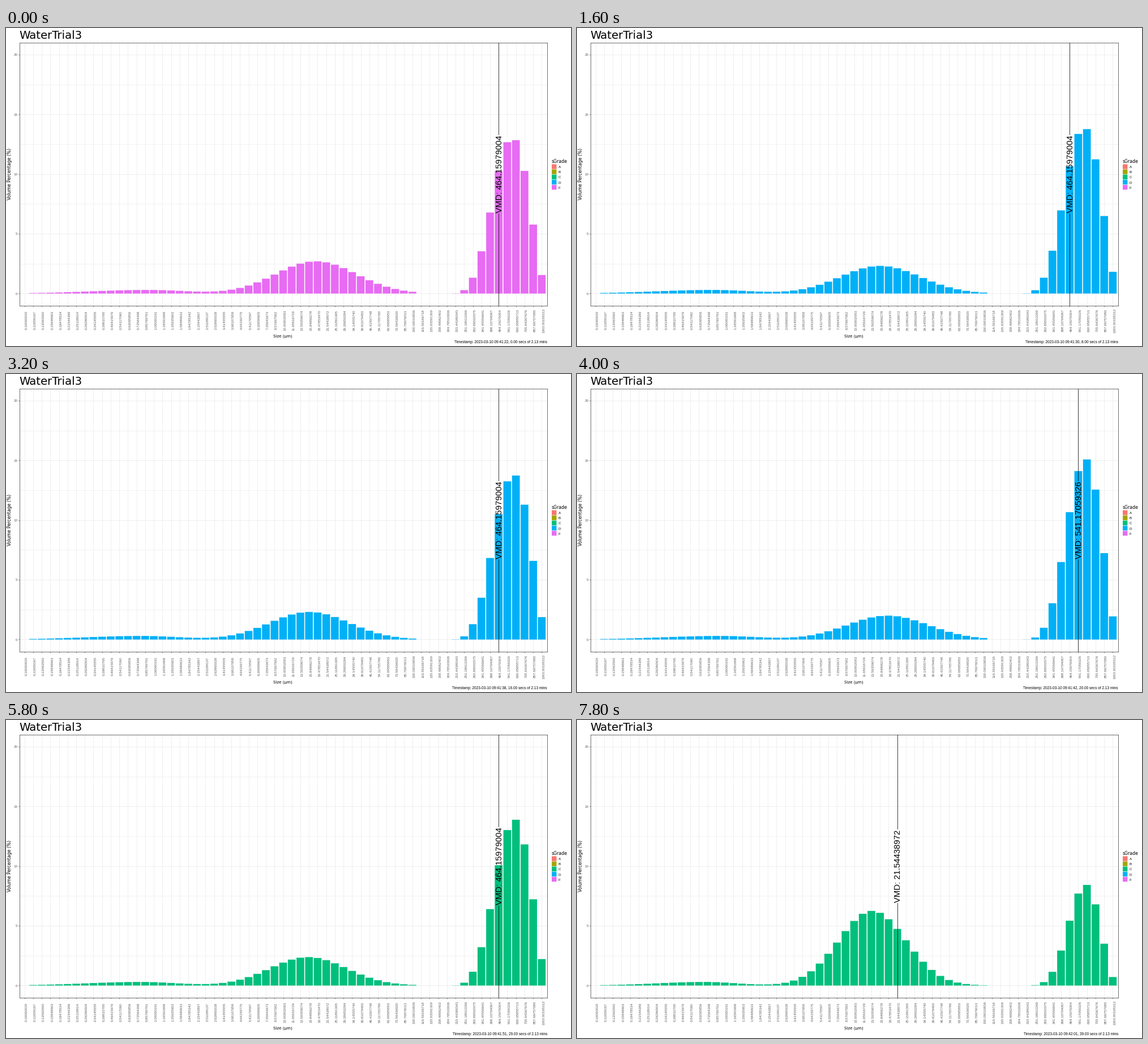
A matplotlib script that plays this animation: 998 by 561 pixels, repeating every 8000 ms.

```python
import numpy as np
import matplotlib.pyplot as plt
from matplotlib.animation import FuncAnimation

W, H, DPI = 998, 561, 64
PX = 72 / DPI                      # points per pixel
FRAMES, INTERVAL = 40, 200

WORDS, DIGITS = "DejaVu Sans", "Liberation Sans"
GREY, DARK, GRID = "#5c5c5c", "#333333", "#ebebeb"
GRADES = {"A": "#f8766d", "B": "#a3a500", "C": "#00bf7d",
          "D": "#00b0f6", "F": "#e76bf3"}

# panel edges in pixels
LEFT, RIGHT, TOP, BOTTOM = 23.5, 955.5, 26, 489.5
BINS = 61
X = np.arange(BINS)
SIZES = np.float32(10 ** (X / 15 - 1) * (1 + 1.96e-6))
STEP = (RIGHT - LEFT) / (BINS + 0.2)
UNIT = (BOTTOM - TOP) / 22

# second, grade, mist (height, bin, width), drops (height, bin, sharpness)
KEYS = [
    (0, "F", 2.70, 33.8, 4.65, 13.10, 56.57, 7.21),
    (4, "D", 1.80, 34.4, 4.85, 16.15, 56.81, 8.30),
    (11, "D", 2.70, 32.0, 4.45, 12.30, 56.53, 6.31),
    (20, "D", 2.00, 33.9, 4.72, 15.15, 56.80, 7.82),
    (29, "C", 2.38, 32.9, 4.42, 13.93, 56.82, 7.07),
    (34, "D", 1.22, 31.9, 4.30, 16.88, 56.84, 7.55),
    (39, "C", 6.25, 32.1, 3.90, 8.46, 56.83, 9.57),
]
TIMES = [key[0] for key in KEYS]


def bell(height, peak, left, right):
    d = (X - peak) / np.where(X < peak, left, right)
    return height * np.exp(-d * d / 2)


def beta(height, peak, sharp, lo=49, hi=61.1):
    """Skewed lobe that is zero outside lo..hi."""
    m = (peak - lo) / (hi - lo)
    u = np.clip((X - lo) / (hi - lo), 0, 1)
    return height * ((u / m) ** m * ((1 - u) / (1 - m)) ** (1 - m)) ** sharp


def volumes(sec):
    mist, bin_, width, drops, peak, sharp = (
        np.interp(sec, TIMES, values) for values in list(zip(*KEYS))[2:])
    fine = (bell(0.3, bin_ - 19.4, 1.45 * width, 0.95 * width)
            + bell(mist, bin_, width, width))
    return np.where((X > 0) & (X < 46), fine, 0) + beta(drops, peak, sharp)


def grade(sec):
    return min(KEYS, key=lambda key: abs(key[0] - sec))[1]


def median_bin(v):
    """Highest bin that still has half of the volume at or above it."""
    tail = np.cumsum(v[::-1])[::-1]
    return int(np.flatnonzero(tail >= 50).max(initial=0))


fig = plt.figure(figsize=(W / DPI, H / DPI), dpi=DPI, facecolor="white")
ax = fig.add_axes([LEFT / W, 1 - BOTTOM / H, (RIGHT - LEFT) / W, (BOTTOM - TOP) / H])


def put(x, y, s, size, font=WORDS, ha="left", color="black", turn=False):
    """Text whose capitals are centred on pixel (x, y) across the baseline."""
    drop = 0.36 * size
    x, y = (x + drop, y) if turn else (x, y + drop)
    return fig.text(x / W, 1 - y / H, s, fontsize=size * PX, family=font,
                    ha=ha, va="baseline", color=color,
                    rotation=90 if turn else 0, rotation_mode="anchor")


def bin_x(i):
    return LEFT + (i + 0.6) * STEP


# panel
ax.set_xlim(-0.6, BINS - 0.4)
ax.set_ylim(-1, 21)
ax.set_axisbelow(True)
ax.set_xticks(X, [""] * BINS)
ax.set_yticks(range(0, 21, 5), [""] * 5)
ax.set_yticks(np.arange(2.5, 20, 5), minor=True)
ax.tick_params(which="major", length=2.3 * PX, width=0.6 * PX, color=DARK)
ax.tick_params(which="minor", length=0)
ax.grid(which="major", color=GRID, linewidth=0.8 * PX)
ax.grid(which="minor", axis="y", color=GRID, linewidth=0.6 * PX)
for side in ax.spines.values():
    side.set(color=DARK, linewidth=0.7 * PX)

# fixed text
put(23.5, 12, "WaterTrial3", 19.8)
put(6.5, 257, "Volume Percentage (%)", 7.8, ha="center", turn=True)
put(489, 543.4, "Size (µm)", 7.1, ha="center")
for i, size in enumerate(SIZES):
    put(bin_x(i) + 2.7, 515.7, f"{size:.8f}", 6.3, DIGITS, "center", GREY, True)
for value in range(0, 21, 5):
    put(20.5, BOTTOM - (value + 1) * UNIT, str(value), 6.3, DIGITS, "right", GREY)

# legend
put(964, 235, "sGrade", 7.8)
for i, (name, color) in enumerate(GRADES.items()):
    y = 244.6 + 9.1 * i
    fig.add_artist(plt.Rectangle((964 / W, 1 - (y + 4.2) / H), 8.4 / W, 8.4 / H,
                                 transform=fig.transFigure, facecolor=color,
                                 edgecolor="none", snap=False))
    put(976, y + 0.4, name, 6.3, DIGITS)

# moving parts
bars = ax.bar(X, np.zeros(BINS), width=0.9, linewidth=0, zorder=2)
for bar in bars:
    bar.set_snap(False)
rule, = ax.plot([], [], color="black", linewidth=0.75 * PX, zorder=3)
label = put(0, 257.5, "", 14.9, DIGITS, "center", turn=True)
caption = put(956, 554, "", 6.5, DIGITS, "right")


def draw(sec):
    v = volumes(sec)
    color = GRADES[grade(sec)]
    for bar, height in zip(bars, v):
        bar.set_height(height)
        bar.set_facecolor(color)

    k = median_bin(v)
    text = f"VMD: {SIZES[k]:.8f}"
    gap = 4.1 * len(text) / UNIT
    rule.set_data([k] * 5, [-1, 10 - gap, np.nan, 10 + gap, 21])
    label.set_text(text)
    label.set_x((bin_x(k) + 0.36 * 14.9) / W)

    clock = 22 + sec
    caption.set_text(f"Timestamp: 2023-03-10 09:{41 + clock // 60}:{clock % 60:02d}, "
                     f"{sec:.2f} secs of 2.13 mins")
    return [*bars, rule, label, caption]


anim = FuncAnimation(fig, draw, frames=FRAMES, interval=INTERVAL,
                     init_func=lambda: draw(0), repeat=True, repeat_delay=0)
plt.show()
```
